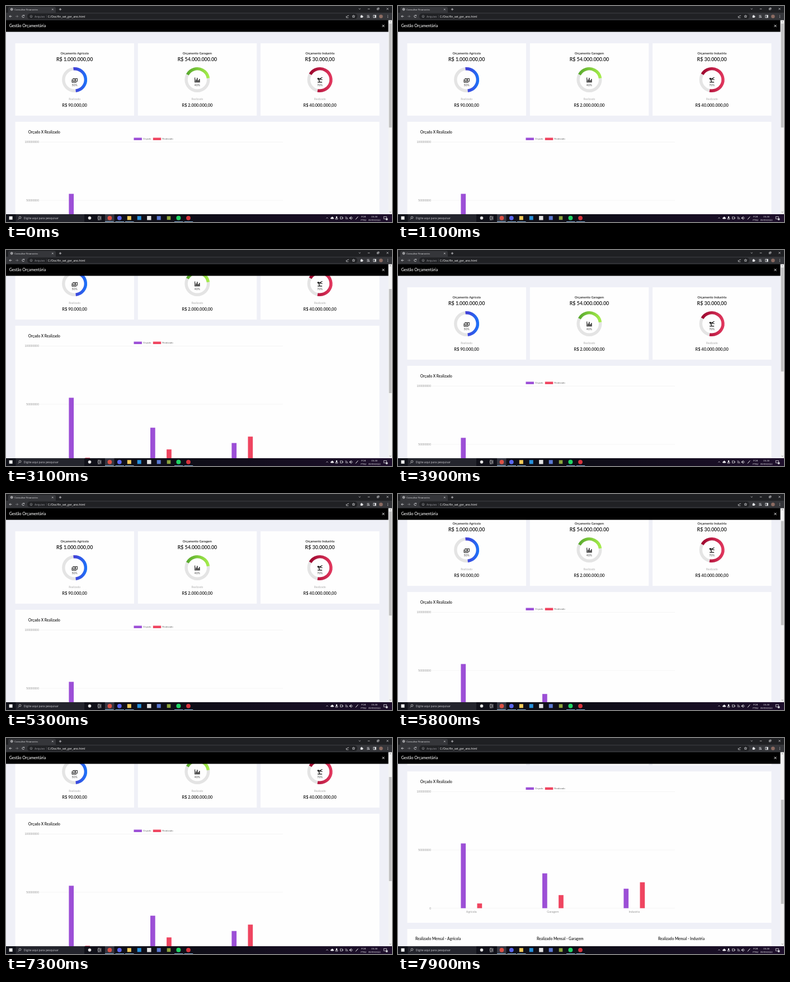
Recreate the animation shown at these times as an HTML page with a canvas. Size 690 by 388 pixels, loop 8 s.

```html
<!DOCTYPE html>
<html lang="pt-BR">
<head>
<meta charset="utf-8">
<title>Gestão Orçamentária</title>
<style>
html, body { margin: 0; width: 690px; height: 388px; overflow: hidden; }
canvas { display: block; width: 690px; height: 388px; }
</style>
</head>
<body>
<canvas id="stage"></canvas>
<script>
const W = 690, H = 388, LOOP = 8000, TICK = 100;
const canvas = document.getElementById('stage');
const g = canvas.getContext('2d');
const ratio = window.devicePixelRatio || 1;
canvas.width = W * ratio;
canvas.height = H * ratio;

const UI = '"Open Sans", sans-serif';
const PAGE = 'Lato, sans-serif';
const CHART = '"Liberation Sans", Arial, sans-serif';
const PURPLE = '#9c4fd6', RED = '#ef4560';

// Wheel movements: start time, then the scroll position on each tick.
const moves = [
  [2100, 8, 32, 36],
  [2900, 44, 68, 72],
  [3600, 64, 46, 6, 0],
  [5700, 8, 32, 36],
  [6900, 44, 68, 72],
  [7800, 104, 148]
];

const cards = [
  { x: 16.5, title: 'Orçamento Agrícola', budget: 'R$ 1.000.000,00', spent: 'R$ 90.000,00',
    share: 0.5, start: -96, left: 0, colors: ['#4340d6', '#1c74fb'], icon: moneyIcon },
  { x: 235.8, title: 'Orçamento Garagem', budget: 'R$ 54.000.000.00', spent: 'R$ 2.000.000,00',
    share: 0.4, start: -152, left: -20, colors: ['#55a62c', '#a8f04c'], icon: barsIcon },
  { x: 455, title: 'Orçamento Industria', budget: 'R$ 30.000,00', spent: 'R$ 40.000.000,00',
    share: 0.7, start: -150, left: -20, colors: ['#98042c', '#e4385f'], icon: armIcon }
];

const groups = [
  { name: 'Agrícola', x: 131.2, tops: [337.4, 445.2] },
  { name: 'Garagem', x: 276.8, tops: [391.2, 430.2] },
  { name: 'Industria', x: 422.2, tops: [418.7, 407.2] }
];

function rect(x, y, w, h, color) {
  g.fillStyle = color;
  g.fillRect(x, y, w, h);
}

function box(x, y, w, h, color, lw = 0.8) {
  g.strokeStyle = color;
  g.lineWidth = lw;
  g.strokeRect(x, y, w, h);
}

function pill(x, y, w, h, r, color) {
  g.fillStyle = color;
  g.beginPath();
  g.roundRect(x, y, w, h, r);
  g.fill();
}

function dot(x, y, r, color) {
  g.fillStyle = color;
  g.beginPath();
  g.arc(x, y, r, 0, Math.PI * 2);
  g.fill();
}

function arc(x, y, r, from, to, color, lw) {
  g.strokeStyle = color;
  g.lineWidth = lw;
  g.beginPath();
  g.arc(x, y, r, from * Math.PI / 180, to * Math.PI / 180);
  g.stroke();
}

function line(color, lw, ...p) {
  g.strokeStyle = color;
  g.lineWidth = lw;
  g.beginPath();
  for (let i = 0; i < p.length; i += 2) g.lineTo(p[i], p[i + 1]);
  g.stroke();
}

function cross(x, y, r, color, lw = 0.8) {
  line(color, lw, x - r, y - r, x + r, y + r);
  line(color, lw, x - r, y + r, x + r, y - r);
}

// Text is placed by the middle of its capitals.
function text(str, x, y, size, color, font = UI, align = 'left', weight = 400) {
  g.font = `${weight} ${size}px ${font}`;
  g.textAlign = align;
  g.fillStyle = color;
  g.fillText(str, x, y + size * 0.36);
}

function moneyIcon(x, y) {
  box(x - 2.7, y - 2.6, 7.4, 4.8, '#111', 1);
  dot(x + 1, y - 0.2, 1.4, '#111');
  line('#111', 1, x - 4.6, y - 1.2, x - 4.6, y + 4.2, x + 3.4, y + 4.2);
}

function barsIcon(x, y) {
  line('#111', 1.1, x - 4.2, y - 4.5, x - 4.2, y + 3.8, x + 4.8, y + 3.8);
  [4, 7, 3, 5].forEach((h, i) => rect(x - 2.8 + i * 2, y + 3.2 - h, 1.4, h, '#111'));
}

function armIcon(x, y) {
  rect(x - 4, y + 3.2, 8, 1.3, '#111');
  line('#111', 1.2, x - 3, y - 2.4, x - 0.4, y + 3.2);
  line('#111', 1.2, x - 3, y - 2.4, x + 1.6, y - 2.6);
  line('#111', 1.1, x - 2, y + 0.4, x + 1.4, y - 2);
  dot(x - 3, y - 2.5, 1.5, '#111');
  line('#111', 1, x + 4.6, y - 4.4, x + 1.8, y - 4, x + 1.8, y - 0.9, x + 4.6, y - 0.6);
}

function drawCard(card) {
  const c = card.x + 106.1, y = 132.5;
  rect(card.x, 67, 212.5, 130, '#fefefe');
  text(card.title, c, 84.7, 5.7, '#1b1b1b', PAGE, 'center', 600);
  text(card.budget, c, 96.3, 8.85, '#111', PAGE, 'center', 600);
  const paint = g.createLinearGradient(c + card.left, y, c + 22, y);
  card.colors.forEach((color, i) => paint.addColorStop(i, color));
  arc(c, y, 19.8, 0, 360, '#e4e4e4', 5.4);
  arc(c, y, 19.8, card.start, card.start + card.share * 360, paint, 5.4);
  card.icon(c, y + 0.5);
  text(card.share * 100 + '%', c, 142.4, 5.2, '#4c4c4c', PAGE, 'center');
  text('Realizado', c, 167.4, 5, '#b0b0b0', PAGE, 'center');
  text(card.spent, c, 178.3, 7.45, '#151515', PAGE, 'center', 600);
}

function drawChart() {
  rect(16.5, 208, 651, 272, '#fefefe');
  text('Orçado X Realizado', 39.7, 226.2, 6.6, '#1b1b1b', PAGE, 'left', 600);
  rect(228.5, 236.6, 14.4, 4.4, PURPLE);
  text('Orçado', 245, 238.9, 4.4, '#666', CHART);
  rect(262.8, 236.6, 14.4, 4.4, RED);
  text('Realizado', 279.2, 238.9, 4.4, '#666', CHART);
  ['100000000', '50000000', '0'].forEach((label, i) => {
    const y = 244.5 + i * 104.6;
    line('#eee', 0.6, 60, y, 495, y);
    text(label, 59, y, 5.1, '#9a9a9a', CHART, 'right');
  });
  for (const { name, x, tops } of groups) {
    tops.forEach((top, i) =>
      rect(x - 18.8 + i * 29.1, top, 8.7, 453.7 - top, i ? RED : PURPLE));
    text(name, x, 459.9, 5.1, '#9a9a9a', CHART, 'center');
  }
}

function drawPage(scroll) {
  rect(0, 25, 684, 349, '#eff0f7');
  g.save();
  g.translate(0, -scroll);
  cards.forEach(drawCard);
  drawChart();
  rect(16.5, 491, 651, 200, '#fefefe');
  groups.forEach(({ name }, i) =>
    text('Realizado Mensal - ' + name, 31 + i * 217, 509, 6.7, '#1b1b1b', PAGE, 'left', 600));
  g.restore();

  rect(683.5, 25, 6.5, 349, '#f3f3f3');
  rect(684.6, 31.3 + scroll * 0.538, 4.8, 187, '#c0c0c0');
  line('#666', 0.8, 685.8, 29, 687, 27.8, 688.2, 29);
  line('#666', 0.8, 685.8, 369.6, 687, 370.8, 688.2, 369.6);

  rect(0, 25, 683.5, 21.4, '#000');
  text('Gestão Orçamentária', 5.7, 35.8, 7, '#fff', PAGE, 'left', 500);
  cross(674.5, 35.7, 1.9, '#fff', 1);
}

function drawBrowser() {
  const ink = '#e2e3e6', dim = '#85868a';
  rect(0, 0, W, 12, '#1f2023');
  pill(4, 1.5, 85, 14, 3, '#35363a');
  rect(0, 12, W, 13.5, '#35363a');

  arc(10.2, 6, 2, 0, 360, ink, 0.7);
  line(ink, 0.6, 8.2, 6, 12.2, 6);
  line(ink, 0.6, 10.2, 4, 10.2, 8);
  text('Consultor Financeiro', 15.3, 6.2, 4.3, '#f4f4f6');
  cross(83.3, 6.2, 1.3, ink, 0.7);
  line(ink, 0.8, 94.8, 6, 99.2, 6);
  line(ink, 0.8, 97, 3.8, 97, 8.2);

  line(ink, 0.7, 630.6, 4.5, 632.2, 6, 633.8, 4.5);
  line(ink, 0.7, 646.7, 5.3, 650.3, 5.3);
  box(663.4, 4.2, 2.6, 2.6, ink, 0.7);
  line(ink, 0.6, 664.5, 3.3, 667, 3.3, 667, 5.8);
  cross(682, 5.2, 1.6, ink, 0.7);

  line(ink, 0.8, 10.4, 18.6, 6, 18.6);
  line(ink, 0.8, 8, 16.6, 6, 18.6, 8, 20.6);
  line(dim, 0.8, 17.2, 18.6, 21.6, 18.6);
  line(dim, 0.8, 19.6, 16.6, 21.6, 18.6, 19.6, 20.6);
  arc(30.8, 18.6, 2, 20, 310, ink, 0.8);
  rect(31.6, 16.2, 1.5, 1.5, ink);

  pill(38, 13.6, 590, 10, 5, '#202124');
  arc(45, 18.7, 2, 0, 360, '#a5a6aa', 0.6);
  line('#a5a6aa', 0.7, 45, 18.4, 45, 20);
  text('Arquivo', 51, 18.8, 5.1, '#9a9ba0');
  line('#5f6064', 0.5, 72.3, 16, 72.3, 21.4);
  text('C:/Doc/fin_set_ger_ano.html', 74.8, 18.8, 5.1, '#fff');

  line(ink, 0.7, 608.3, 18, 608.3, 21, 612.3, 21);
  line(ink, 0.7, 609.5, 19.5, 610.5, 17.5, 613, 17.2);
  g.beginPath();
  for (let i = 0; i < 10; i++) {
    const a = i * Math.PI / 5 - Math.PI / 2, r = i % 2 ? 1.1 : 2.5;
    g.lineTo(621.3 + r * Math.cos(a), 18.7 + r * Math.sin(a));
  }
  g.closePath();
  g.stroke();

  rect(633.7, 17.2, 3.8, 3.8, ink);
  dot(635.6, 17, 0.9, ink);
  dot(637.7, 19, 0.9, ink);
  [0, 1.8, 3.6].forEach(d => line(ink, 0.8, 645.3, 17 + d, 649.5 - d * 0.5, 17 + d));
  dot(649, 20, 0.9, ink);
  box(656.8, 16.5, 4.4, 4.4, ink, 0.8);
  rect(659.1, 16.5, 2.1, 4.4, ink);
  dot(670.3, 18.7, 3.3, '#8b6b62');
  [16.8, 18.7, 20.6].forEach(y => dot(682.4, y, 0.55, ink));
}

function drawApps() {
  rect(177, 374, 16.5, 14, '#363742');
  const circles = [[149.5, '#e6e6e6', 2.8], [185.4, '#dc5044', 3.9], [202.8, '#5966ef', 3.9],
    [308.4, '#1fd463', 4], [326, '#d7323c', 3.9]];
  circles.forEach(([x, color, r]) => dot(x, 380.8, r, color));
  const squares = [[8.6, '#f2f2f2', 6], [220.3, '#f4cb57', 7], [238.2, '#2791dc', 7],
    [255.8, '#e4e4e4', 7.4], [273.2, '#5b78d0', 7], [291, '#8ba43c', 6.6]];
  squares.forEach(([x, color, s]) => rect(x - s / 2, 380.8 - s / 2, s, s, color));
  box(164.3, 379.2, 3.6, 3.4, '#ddd', 0.7);
  line('#ddd', 0.7, 164, 377.6, 168.2, 377.6);
  line('#ddd', 0.7, 164, 384.2, 168.2, 384.2);
  line('#ddd', 0.8, 169.6, 377.4, 169.6, 384.4);
  [177, 195.5, 213, 301, 318.7].forEach(x => rect(x, 387, 15.5, 1, '#86b4dc'));
}

function drawTray() {
  const ink = '#f0f0f3';
  line(ink, 0.7, 572.4, 381.6, 574, 380, 575.6, 381.6);
  pill(580.2, 380, 5.8, 2.6, 1.3, ink);
  dot(583.2, 380, 1.6, ink);
  pill(589.8, 377.8, 2.4, 4, 1.2, ink);
  line(ink, 0.7, 589, 381, 589, 383, 593, 383, 593, 381);
  box(597.6, 379, 4, 3.6, ink, 0.7);
  rect(602, 380, 0.8, 1.6, ink);
  [1.5, 3, 4.5].forEach(r => arc(606.5, 383.2, r, -90, 0, ink, 0.6));
  rect(614, 379.8, 1.6, 2.2, ink);
  line(ink, 0.8, 615.4, 380, 617, 378.4, 617, 383.4, 615.4, 381.8);
  arc(617, 380.9, 2.2, -50, 50, ink, 0.6);
  line(ink, 1, 625, 383.4, 629.3, 378.4);
  text('POR', 639.2, 378.2, 4.1, ink, UI, 'center');
  text('PTB2', 639.2, 384.4, 4.1, ink, UI, 'center');
  text('05:38', 658.6, 378.2, 4.1, ink, UI, 'center');
  text('09/09/2022', 658.6, 384.4, 4.1, ink, UI, 'center');
  box(675.2, 378.3, 5, 4, ink, 0.7);
  dot(680.6, 383, 2, '#d0d0d6');
}

function drawTaskbar() {
  const shade = g.createLinearGradient(0, 0, W, 0);
  shade.addColorStop(0, '#11131a');
  shade.addColorStop(0.5, '#0e0d17');
  shade.addColorStop(1, '#1e0f2c');
  rect(0, 374, W, 14, shade);
  rect(17.5, 374, 122.5, 14, '#24252d');
  arc(25, 380, 1.9, 0, 360, '#ddd', 0.7);
  line('#ddd', 0.8, 23.6, 381.5, 21.7, 383.5);
  text('Digite aqui para pesquisar', 31.8, 381, 5.1, '#cfcfd4');
  drawApps();
  drawTray();
}

function scrollAt(t) {
  let position = 0;
  for (const [start, ...stops] of moves) {
    if (t < start) break;
    const i = Math.floor((t - start) / TICK);
    position = stops[Math.min(i, stops.length - 1)];
  }
  return position;
}

function frame() {
  g.setTransform(ratio, 0, 0, ratio, 0, 0);
  drawPage(scrollAt(performance.now() % LOOP));
  drawBrowser();
  drawTaskbar();
  requestAnimationFrame(frame);
}

frame();
</script>
</body>
</html>
```
